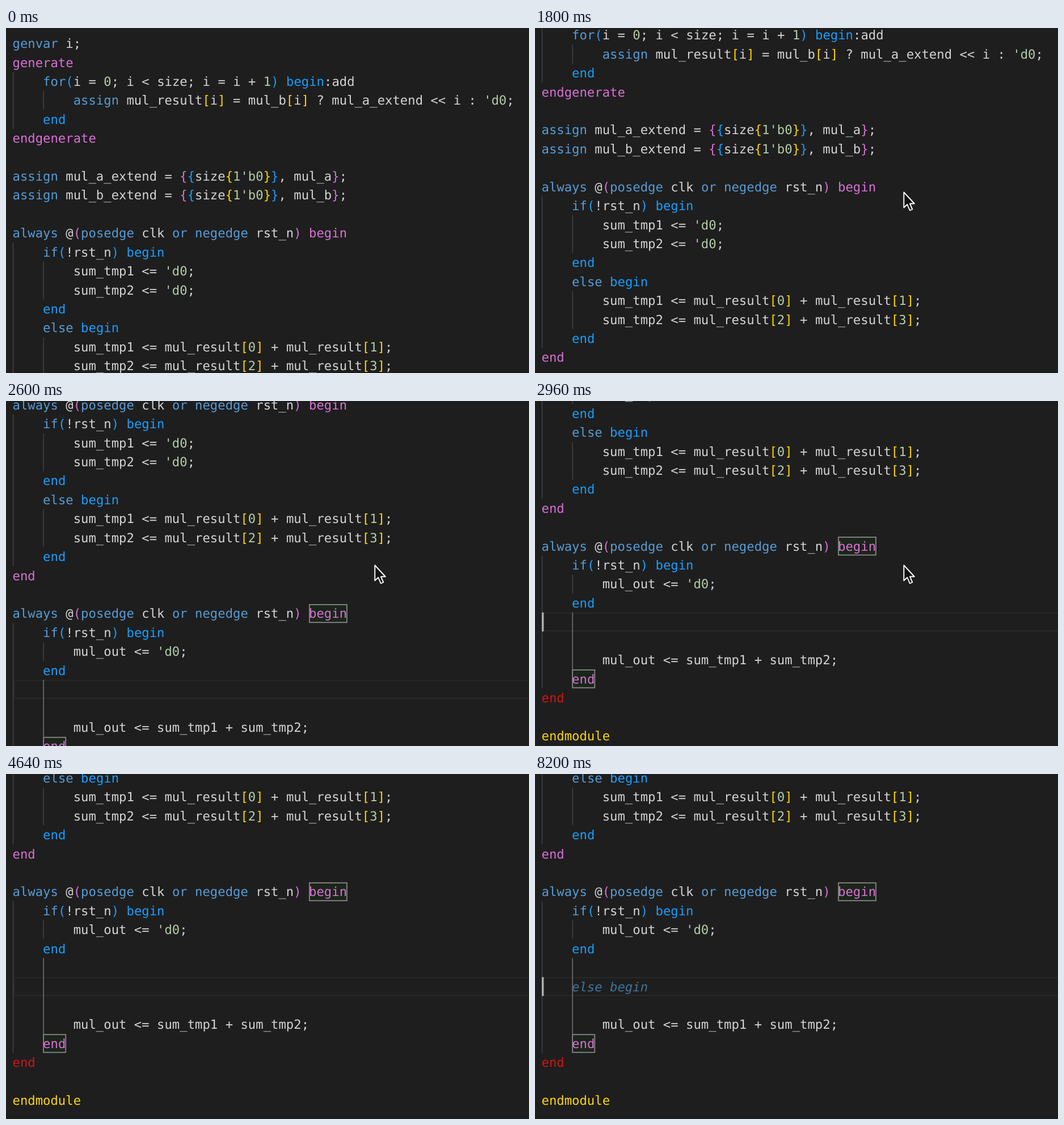
Write an HTML page that moves like this. It is 922 px wide and 608 px high and loops after 8.68 s.

```html
<!DOCTYPE html>
<html lang="en">
<head>
<meta charset="utf-8">
<title>Code editor</title>
<style>
  html, body { margin: 0; width: 100%; height: 100%; overflow: hidden; background: #1e1e1e; }
  svg { display: block; width: 922px; height: 608px; }
  text {
    font: 22.25px "DejaVu Sans Mono", "Liberation Mono", monospace;
    white-space: pre;
    text-rendering: geometricPrecision;
  }
</style>
</head>
<body>
<svg id="stage" viewBox="0 0 922 608"></svg>
<script>
const LOOP = 8680, LAST_CHANGE = 8200, STEP = 40;
const ENTER = 4000, GHOST = 4800;
const LEFT = 11.5, TOP = 10.5, CHAR = 13.396, LINE = 33.42, BASE = 24.6;
const PLAIN = '#d4d4d4', KEYWORD = '#569cd6', NUMBER = '#b5cea8', STRAY = '#d21414';
const LEVELS = ['#ffd700', '#da70d6', '#179fff'];

const source = `genvar i;
generate
    for(i = 0; i < size; i = i + 1) begin:add
        assign mul_result[i] = mul_b[i] ? mul_a_extend << i : 'd0;
    end
endgenerate

assign mul_a_extend = {{size{1'b0}}, mul_a};
assign mul_b_extend = {{size{1'b0}}, mul_b};

always @(posedge clk or negedge rst_n) begin
    if(!rst_n) begin
        sum_tmp1 <= 'd0;
        sum_tmp2 <= 'd0;
    end
    else begin
        sum_tmp1 <= mul_result[0] + mul_result[1];
        sum_tmp2 <= mul_result[2] + mul_result[3];
    end
end

always @(posedge clk or negedge rst_n) begin
    if(!rst_n) begin
        mul_out <= 'd0;
    end


        mul_out <= sum_tmp1 + sum_tmp2;
    end
end

endmodule`;

function add(parent, tag, attrs = {}) {
  const node = document.createElementNS('http://www.w3.org/2000/svg', tag);
  set(node, attrs);
  return parent.appendChild(node);
}
function set(node, attrs) {
  for (const key in attrs) node.setAttribute(key, attrs[key]);
}
const colX = col => LEFT + col * CHAR;
const rowY = row => TOP + row * LINE;
const show = (node, on) => set(node, { visibility: on ? 'visible' : 'hidden' });

// Bracket and block colours follow the nesting depth; the module itself is depth 0.
let depth = 1;
function colorOf(token) {
  if (/^([({[]|begin|generate)$/.test(token)) return LEVELS[depth++ % 3];
  if (token === 'endmodule') return LEVELS[0];
  if (/^([)}\]]|end|endgenerate)$/.test(token)) return depth > 1 ? LEVELS[--depth % 3] : STRAY;
  if (/^(genvar|for|assign|always|posedge|negedge|or|if|else)$/.test(token)) return KEYWORD;
  return /^(\d|')/.test(token) ? NUMBER : PLAIN;
}

const stage = document.getElementById('stage');
const page = add(stage, 'g');

function guide(col, from, to, color = '#404040') {
  return add(page, 'rect', {
    x: colX(col) + .3, y: rowY(from), width: 1.6, height: (to - from) * LINE, fill: color
  });
}
function matchBox(parent, col, row, length) {
  add(parent, 'rect', {
    x: colX(col) + 1, y: rowY(row) + 1, width: length * CHAR - 1, height: LINE - 2,
    fill: 'rgba(0,100,0,.1)', stroke: '#888', 'stroke-width': 1.8
  });
}

const currentLine = add(page, 'rect', {
  x: 14.5, width: 930, height: LINE - 2, fill: 'none', stroke: '#292929', 'stroke-width': 2
});
guide(0, 2, 5);
guide(4, 3, 4);
guide(0, 11, 19);
guide(4, 12, 14);
guide(4, 16, 18);
guide(4, 23, 24);
const blockGuide = guide(0, 22, 29);
const activeGuide = guide(4, 25, 28, '#707070');

const tail = add(page, 'g');
matchBox(page, 39, 21, 5);
matchBox(tail, 4, 28, 3);

source.split('\n').forEach((line, row) => {
  const text = add(row > 26 ? tail : page, 'text', { x: LEFT, y: rowY(row) + BASE });
  for (const token of line.match(/\s+|\d*'\w+|\w+|./g) || []) {
    add(text, 'tspan', { fill: colorOf(token) }).textContent = token;
  }
});

const ghost = add(page, 'text', {
  x: colX(4), y: rowY(26) + BASE, fill: '#41739c', 'font-style': 'italic'
});
ghost.style.fontStyle = 'italic';
ghost.textContent = 'else begin';

const caret = add(page, 'rect', { x: 12, width: 3.4, height: LINE, fill: '#aeafad' });
const pointer = add(stage, 'path', {
  d: 'M0 0V27L6 21.5L10.5 32L15 30L10.6 20H18.5Z',
  fill: '#111', stroke: '#fff', 'stroke-width': 1.9, 'stroke-linejoin': 'round'
});

// Scroll keys: time, offset, speed in px per ms.
const scrollKeys = [
  [1340, 0, 0], [1800, 81.6, .33], [2600, 354.5, .34], [2960, 473.3, .28], [3320, 521.5, 0]
];
function scrollAt(t) {
  const next = scrollKeys.findIndex(key => t < key[0]);
  if (next === 0) return 0;
  if (next < 0) return scrollKeys[scrollKeys.length - 1][1];
  const [t0, y0, v0] = scrollKeys[next - 1], [t1, y1, v1] = scrollKeys[next];
  const span = t1 - t0, u = (t - t0) / span, w = 1 - u;
  return y0 * w * w * (1 + 2 * u) + y1 * u * u * (3 - 2 * u)
    + span * u * w * (v0 * w - v1 * u);
}

function caretOn(t) {
  return t < ENTER ? (t + 320) % 1000 < 500 : (t - ENTER) % 1020 < 510;
}

function draw(t) {
  const added = t >= ENTER ? 1 : 0;
  set(page, { transform: `translate(0 ${-scrollAt(t)})` });
  set(tail, { transform: `translate(0 ${added * LINE})` });
  set(currentLine, { y: rowY(25 + added) + 1 });
  set(caret, { y: rowY(25 + added) });
  set(blockGuide, { height: (7 + added) * LINE });
  set(activeGuide, { height: (3 + added) * LINE });
  show(caret, caretOn(t));
  show(ghost, t >= GHOST);

  const left = Math.pow(1 - Math.min(1, Math.max(0, (t - 840) / 360)), 2);
  set(pointer, { transform: `translate(${650.3 + 231 * left} ${289.5 + 312 * left})` });
  show(pointer, t >= 840 && !added);
}

const start = performance.now();
function tick() {
  const t = (performance.now() - start) % LOOP;
  draw(Math.min(LAST_CHANGE, Math.floor(t / STEP) * STEP));
  requestAnimationFrame(tick);
}
tick();
</script>
</body>
</html>
```
